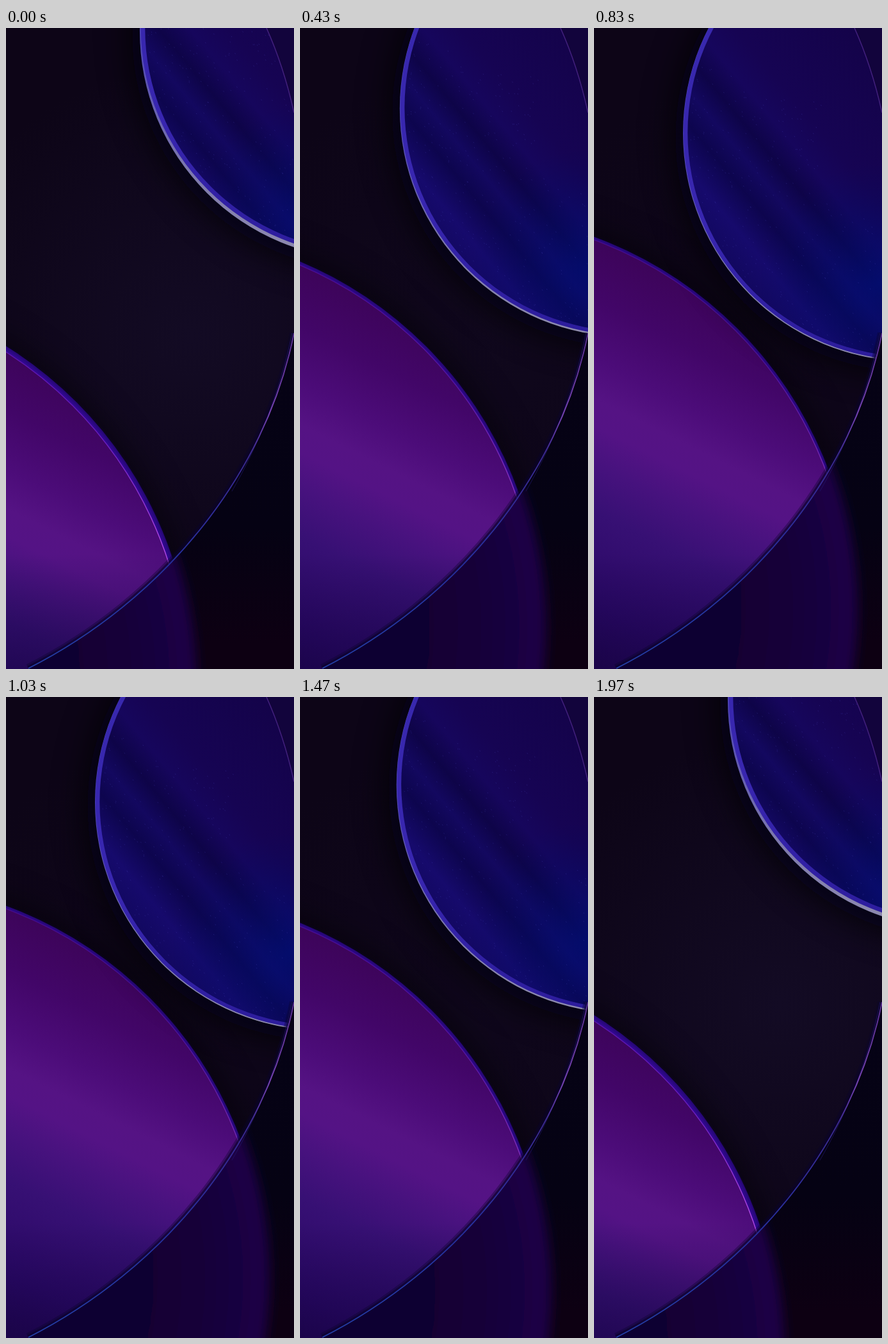
Animation of 450x1000 px, one loop 2000 ms. Source, as an HTML page:

```html
<!DOCTYPE html>
<html lang="en">
<head>
<meta charset="utf-8">
<title>Glass discs</title>
<style>
  html, body { margin: 0; width: 100%; height: 100%; overflow: hidden; background: #07030f; }
  svg { display: block; width: 100%; height: 100%; }
</style>
</head>
<body>
<svg viewBox="0 0 450 1000" preserveAspectRatio="none">
  <defs>
    <clipPath id="lens">
      <path d="M0 0H407Q434 60 450 132V476C405 701 242 894 35 999L0 1016Z"/>
    </clipPath>
    <clipPath id="bodyClip"><circle cx="495" cy="164" r="349"/></clipPath>
    <filter id="soft" x="-20%" y="-20%" width="140%" height="140%"><feGaussianBlur stdDeviation="9"/></filter>
    <filter id="shade" x="-30%" y="-30%" width="160%" height="160%"><feGaussianBlur stdDeviation="28"/></filter>

    <linearGradient id="outside" x1="0" y1="0" x2="0" y2="1">
      <stop offset="0" stop-color="#06031a"/>
      <stop offset=".78" stop-color="#050213"/>
      <stop offset=".96" stop-color="#0d0012"/>
    </linearGradient>
    <radialGradient id="glow" gradientUnits="userSpaceOnUse" cx="290" cy="480" r="420">
      <stop offset="0" stop-color="#130b24"/>
      <stop offset="1" stop-color="#130b24" stop-opacity="0"/>
    </radialGradient>
    <radialGradient id="halo">
      <stop offset=".65" stop-color="#100030"/>
      <stop offset=".85" stop-color="#15013a"/>
      <stop offset=".98" stop-color="#1c0446"/>
    </radialGradient>
    <linearGradient id="dusk" gradientUnits="userSpaceOnUse" x1="0" y1="820" x2="0" y2="1000">
      <stop offset="0" stop-color="#12033c" stop-opacity="0"/>
      <stop offset="1" stop-color="#12033c" stop-opacity=".5"/>
    </linearGradient>
    <radialGradient id="violetRim">
      <stop offset=".983" stop-color="#3a0aa4"/>
      <stop offset="1" stop-color="#240672"/>
    </radialGradient>
    <linearGradient id="violet" gradientUnits="userSpaceOnUse" x1="0" y1="326" x2="-280" y2="886">
      <stop offset="0" stop-color="#3d045a"/>
      <stop offset=".14" stop-color="#420668"/>
      <stop offset=".27" stop-color="#4c0c79"/>
      <stop offset=".36" stop-color="#551384"/>
      <stop offset=".42" stop-color="#541385"/>
      <stop offset=".5" stop-color="#47127e"/>
      <stop offset=".61" stop-color="#371074"/>
      <stop offset=".82" stop-color="#2a0866"/>
      <stop offset="1" stop-color="#200450"/>
    </linearGradient>
    <linearGradient id="violetEdge" gradientUnits="userSpaceOnUse" x1="0" y1="330" x2="0" y2="690">
      <stop offset="0" stop-color="#5510a6"/>
      <stop offset=".55" stop-color="#6a1ebc"/>
      <stop offset="1" stop-color="#b048e4"/>
    </linearGradient>
    <linearGradient id="blue" gradientUnits="userSpaceOnUse" x1="400" y1="0" x2="76" y2="270">
      <stop offset="0" stop-color="#14034a"/>
      <stop offset=".33" stop-color="#160453"/>
      <stop offset=".44" stop-color="#16065c"/>
      <stop offset=".53" stop-color="#0e0448"/>
      <stop offset=".61" stop-color="#13085f"/>
      <stop offset=".69" stop-color="#0d054e"/>
      <stop offset=".8" stop-color="#160a6c"/>
      <stop offset="1" stop-color="#0e0654"/>
    </linearGradient>
    <radialGradient id="deep" gradientUnits="userSpaceOnUse" cx="445" cy="400" r="190">
      <stop offset="0" stop-color="#000f78" stop-opacity=".75"/>
      <stop offset="1" stop-color="#000a60" stop-opacity="0"/>
    </radialGradient>
    <linearGradient id="blueEdge" x1="0" y1="0" x2="0" y2="1">
      <stop offset=".3" stop-color="#3828ae"/>
      <stop offset=".7" stop-color="#3826b0"/>
      <stop offset="1" stop-color="#2c1c9c"/>
    </linearGradient>
    <linearGradient id="silver" x1="0" y1="0" x2="0" y2="1">
      <stop offset=".5" stop-color="#4a40b4"/>
      <stop offset=".8" stop-color="#7c78ae"/>
      <stop offset="1" stop-color="#8f8cae"/>
    </linearGradient>
    <linearGradient id="arc" gradientUnits="userSpaceOnUse" x1="0" y1="476" x2="0" y2="999">
      <stop offset="0" stop-color="#5a2f94"/>
      <stop offset=".24" stop-color="#7a45b4"/>
      <stop offset=".36" stop-color="#3c2a92"/>
      <stop offset=".68" stop-color="#26309e"/>
      <stop offset="1" stop-color="#2440a8"/>
    </linearGradient>
  </defs>

  <rect width="450" height="1000" fill="url(#outside)"/>
  <circle id="haloDisc" cx="-213" cy="907" r="625" fill="url(#halo)" filter="url(#soft)"/>
  <path d="M405 0H450V134Q434 60 405 0Z" fill="#12043c"/>

  <g clip-path="url(#lens)">
    <rect width="450" height="1016" fill="#0d0517"/>
    <rect id="glowRect" width="450" height="1000" fill="url(#glow)"/>
    <g id="violetDisc">
      <circle cx="-213" cy="907" r="622" fill="#030108" opacity=".6" filter="url(#shade)"/>
      <circle cx="-213" cy="907" r="619" fill="url(#violetRim)"/>
      <circle id="violetBody" cx="-213" cy="907" fill="url(#violet)" stroke="url(#violetEdge)" stroke-width="1.4"/>
    </g>
    <rect y="820" width="450" height="196" fill="url(#dusk)"/>
    <g id="blueDisc">
      <circle cx="493" cy="170" r="366" fill="#030108" opacity=".85" filter="url(#shade)"/>
      <circle cx="495" cy="164" r="356" fill="url(#silver)"/>
      <circle id="blueRim" cx="495" cy="164" r="355.5" fill="url(#blueEdge)"/>
      <g id="blueBody" clip-path="url(#bodyClip)">
        <g id="fabric">
          <rect x="0" y="-300" width="700" height="1100" fill="url(#blue)"/>
          <rect x="0" y="-300" width="700" height="1100" fill="url(#deep)"/>
        </g>
        <path id="grain" stroke="#4a48c0" stroke-width="1" stroke-opacity=".3" fill="none"/>
      </g>
    </g>
    <g fill="none" stroke="#0a032c">
      <path d="M450 476C405 701 242 894 35 999" stroke-width="14" stroke-opacity=".35"/>
      <path d="M450 476C405 701 242 894 35 999" stroke-width="8" stroke-opacity=".6"/>
    </g>
  </g>

  <g fill="none">
    <path d="M407 0Q434 60 450 132" stroke="#42207c" stroke-width="1.5"/>
    <path d="M447 476C402 699 260 870 240 846" stroke="#261c72" stroke-width="1" stroke-opacity=".6" stroke-dasharray="265 999"/>
    <path d="M450 476C405 701 242 894 35 999" stroke="url(#arc)" stroke-width="1.8"/>
  </g>
</svg>
<script>
  const LOOP = 2000, FRAMES = 60, SETTLE = 24.2, TRAVEL = 159;
  const el = id => document.getElementById(id);
  const move = (id, x, y) => el(id).setAttribute('transform', `translate(${x.toFixed(2)} ${y.toFixed(2)})`);

  // Fine grain of the blue material, denser toward its left rim.
  let seed = 7;
  const random = () => (seed = seed * 16807 % 2147483647) / 2147483647;
  el('grain').setAttribute('d', Array.from({ length: 260 }, () => {
    const angle = 1.75 + random() * 1.7;
    const radius = 345 - 200 * random() ** 1.6;
    const x = 495 + radius * Math.cos(angle), y = 162 + radius * Math.sin(angle);
    return `M${x.toFixed(1)} ${y.toFixed(1)}l1.3 .9`;
  }).join(''));

  // The discs approach with an ease-out, rest, then retrace the same path.
  function draw(time) {
    const step = Math.floor((time % LOOP + 7) * FRAMES / LOOP) % FRAMES;
    const k = Math.min(step, FRAMES - 1 - step);
    const away = Math.max(0, 1 - k / SETTLE) ** 1.85;
    const d = TRAVEL * away, s = 0.72 * d;

    move('blueDisc', 0.44 * d, -d);
    move('blueRim', 0.3 + away, -1.2 - 3.4 * away);
    move('blueBody', 0.3 + away, -0.6 - 4.4 * away);
    move('fabric', -0.17 * d, 0.4 * d); // the folds lag behind the rim
    move('violetDisc', -s, s);
    move('haloDisc', -s, s);
    el('violetBody').setAttribute('r', 614.5 - 3.5 * away);
    el('violetBody').setAttribute('stroke-opacity', 0.5 + 0.5 * away);
    el('glowRect').setAttribute('opacity', 0.25 + 0.75 * away);
  }

  let start;
  function tick(now) {
    start ??= now;
    draw(now - start);
    requestAnimationFrame(tick);
  }
  draw(0);
  requestAnimationFrame(tick);
</script>
</body>
</html>
```
